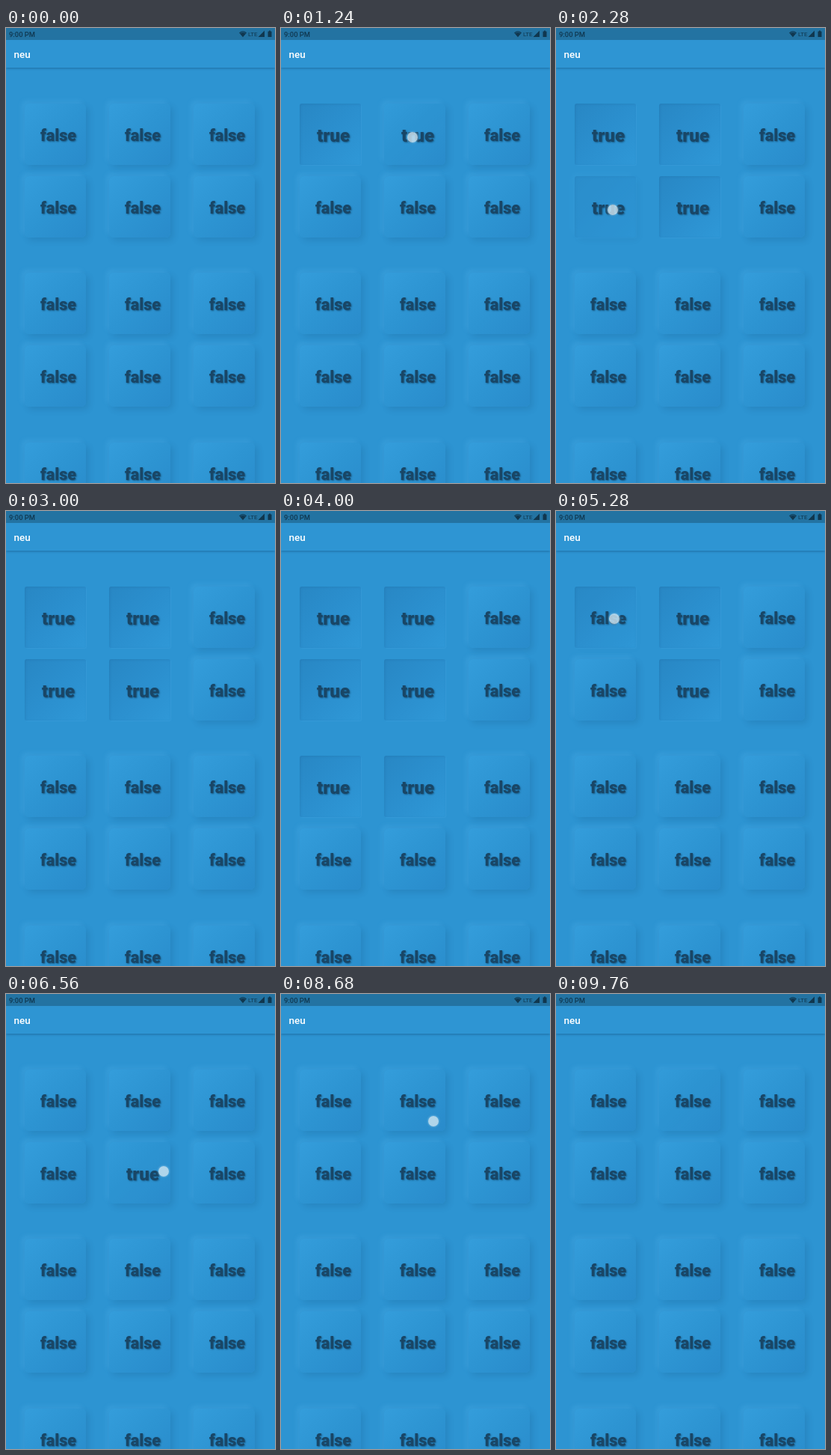
These frames come from a looping animation (360x608 px, 9800 ms). An HTML page:

```html
<!DOCTYPE html>
<html lang="en">
<head>
<meta charset="utf-8">
<title>neu</title>
<style>
html, body { margin: 0; width: 100%; height: 100%; overflow: hidden; background: #2d94d2; }
body { position: relative; font-family: Roboto, sans-serif; }
.status { position: absolute; inset: 0 0 auto; height: 16px; background: #2373a2; z-index: 2; }
.bar { position: absolute; top: 16px; left: 0; right: 0; height: 37px; background: #2e95d3;
  box-shadow: 0 1px 3px rgba(0, 40, 75, .36); color: #fff; font: 500 13.5px/39px Roboto, sans-serif;
  text-indent: 10.5px; z-index: 1; }
.tile, .tile i { position: absolute; width: 82px; height: 82px; border-radius: 6px; }
.tile i { left: 0; top: 0; }
.up { background: linear-gradient(135deg, #349ddb, #2d94d2 50%, #298bcb);
  box-shadow: 4px 4px 9px rgba(0, 45, 85, .13), -4px -4px 6px rgba(105, 200, 255, .16); }
.tile .down { border-radius: 3px; background: linear-gradient(135deg, #2887c4, #2b8fce 50%, #2f98d7);
  box-shadow: inset 1px 1px 3px rgba(0, 50, 90, .1), 1px 1px 2px rgba(105, 200, 255, .14); }
.tile span { position: absolute; left: -8px; width: 106px; top: 23px; text-align: center;
  font-weight: 900; line-height: 40px; color: #194666; text-shadow: 1px 1px 2px rgba(5, 35, 60, .5); }
#dot { position: absolute; width: 14px; height: 14px; margin: -7px; border-radius: 50%;
  background: rgba(205, 228, 240, .82); box-shadow: 0 0 2px 1px rgba(120, 190, 230, .55); }
</style>
</head>
<body>
<div class="status">
  <svg width="360" height="16" fill="#10374f" font-family="Roboto, sans-serif">
    <text x="4" y="11.8" font-size="9.4" font-weight="500">9:00 PM</text>
    <path d="M312 6.3Q317 2.4 322 6.3L317 12.2Z"/>
    <path d="M313.5 6.8Q317 4.2 320.5 6.8" fill="none" stroke="#2373a2" stroke-width=".6"/>
    <text x="324" y="11.3" font-size="8">LTE</text>
    <path d="M346 3.5V12H337.5ZM350.5 4.5H352V3.5H354V4.5H355.5V12H350.5Z"/>
  </svg>
</div>
<div class="bar">neu</div>
<div id="dot"></div>
<script>
const LOOP = 9800, ROWS = 5, COLS = 3, SIZE = 82;
const REACT = 30, HOLD = 165, FADE = 200;

// Each run taps its tiles at a steady pace, offset (dx, dy) from their centres.
const runs = [
  { start: 905, gap: 300, tiles: '014', dx: -3, dy: 4 },
  { start: 2140, gap: 0, tiles: '3', dx: 10, dy: 4 },
  { start: 3300, gap: 230, tiles: '76', dx: 0, dy: 0 },
  { start: 4205, gap: 400, tiles: '76', dx: 11.5, dy: -4.5 },
  { start: 4930, gap: 280, tiles: '3014', dx: 12, dy: 2 },
  { start: 6525, gap: 725, tiles: '44', dx: 31.5, dy: -2.5 },
  { start: 8670, gap: 880, tiles: '11', dx: 24.5, dy: 27.5 }
];

const left = i => 25 + 113 * (i % COLS);
const top_ = i => {
  const row = Math.floor(i / COLS);
  return 101 + 97 * (row % 2) + Math.floor(226.5 * Math.floor(row / 2));
};

const taps = runs.flatMap(({ start, gap, tiles, dx, dy }) => [...tiles].map((tile, n) => ({
  time: start + n * gap,
  tile: +tile,
  x: left(tile) + SIZE / 2 + dx,
  y: top_(tile) + SIZE / 2 + dy
})));

const dot = document.getElementById('dot');
const tiles = Array.from({ length: ROWS * COLS }, (_, i) => {
  const tile = document.createElement('div');
  tile.className = 'tile';
  tile.style.cssText = `left:${left(i)}px;top:${top_(i)}px`;
  tile.innerHTML = '<i class="up"></i><i class="down"></i><span></span>';
  document.body.insertBefore(tile, dot);
  return tile;
});

// The label flips at once; the surface eases into its new state.
function drawTile(tile, index, t) {
  const past = taps.filter(tap => tap.tile === index && t >= tap.time + REACT);
  const on = past.length % 2 === 1;
  const p = past.length ? Math.min(1, (t - past.at(-1).time - REACT) / FADE) : 1;
  const eased = p * p * (3 - 2 * p);
  const depth = on ? eased : 1 - eased;
  const [up, down, label] = tile.children;
  up.style.opacity = 1 - depth;
  down.style.opacity = depth;
  label.textContent = on;
  label.style.fontSize = on ? '24px' : '21.5px';
}

function frame() {
  const t = performance.now() % LOOP;
  tiles.forEach((tile, i) => drawTile(tile, i, t));
  const touch = taps.find(({ time }) => t >= time && t < time + HOLD);
  dot.hidden = !touch;
  if (touch) dot.style.cssText = `left:${touch.x}px;top:${touch.y}px`;
  requestAnimationFrame(frame);
}
frame();
</script>
</body>
</html>
```
